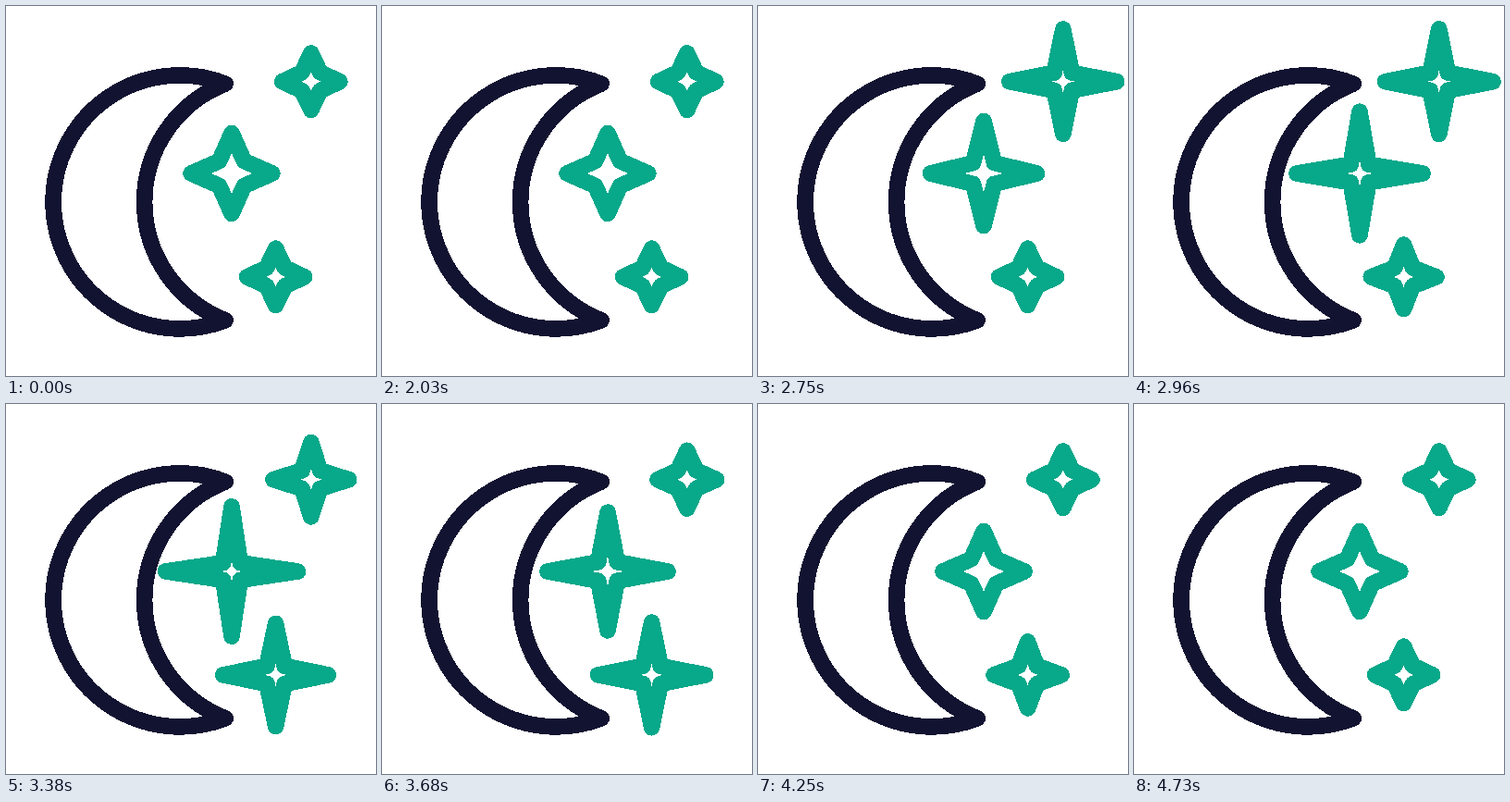
These frames come from a looping animation (400x400 px, 5.03 s). An HTML page:

```html
<!DOCTYPE html>
<html lang="en">
<head>
<meta charset="utf-8">
<title>Moon and stars</title>
<style>
  html, body { margin: 0; width: 100%; height: 100%; overflow: hidden; background: #fff; }
  svg { display: block; width: 100%; height: 100%; shape-rendering: crispEdges; }
  path { fill: none; stroke-width: 17.6; stroke-linecap: round; stroke-linejoin: round; }
  .moon { stroke: #121331; }
  .star {
    stroke: #08a88a;
    animation: 5030ms cubic-bezier(.4, 0, .4, 1) infinite;
  }
  .small { d: path("M0 -30.7L9.9 -9.9L31.1 0L9.9 9.9L0 30.7L-9.9 9.9L-31.1 0L-9.9 -9.9Z"); }
  .large { d: path("M0 -43.5L13.4 -13.4L44 0L13.4 13.4L0 43.5L-13.4 13.4L-44 0L-13.4 -13.4Z"); }
  .top { animation-name: twinkle-top; }
  .middle { animation-name: twinkle-middle; }
  .bottom { animation-name: twinkle-bottom; }

  /* Each star stretches its tips, holds briefly, then settles back. */
  @keyframes twinkle-top {
    0%, 40.06%, 76.04%, 100% { d: path("M0 -30.7L9.9 -9.9L31.1 0L9.9 9.9L0 30.7L-9.9 9.9L-31.1 0L-9.9 -9.9Z"); }
    56.16%, 58.45% { d: path("M0 -56.8L9.6 -9.6L58.2 0L9.6 9.6L0 56.8L-9.6 9.6L-58.2 0L-9.6 -9.6Z"); }
  }
  @keyframes twinkle-middle {
    0%, 47.91%, 85.88%, 100% { d: path("M0 -43.5L13.4 -13.4L44 0L13.4 13.4L0 43.5L-13.4 13.4L-44 0L-13.4 -13.4Z"); }
    64.02%, 67.99% { d: path("M0 -70.1L9.3 -9.3L71.5 0L9.3 9.3L0 70.1L-9.3 9.3L-71.5 0L-9.3 -9.3Z"); }
  }
  @keyframes twinkle-bottom {
    0%, 55.21%, 91.65%, 100% { d: path("M0 -30.7L9.9 -9.9L31.1 0L9.9 9.9L0 30.7L-9.9 9.9L-31.1 0L-9.9 -9.9Z"); }
    70.42%, 73.56% { d: path("M0 -56.8L9.6 -9.6L58.2 0L9.6 9.6L0 56.8L-9.6 9.6L-58.2 0L-9.6 -9.6Z"); }
  }
</style>
</head>
<body>
<svg viewBox="0 0 400 400">
  <path class="moon" d="M237.2 84A137 137 0 1 0 237.2 339.8A137.2 137.2 0 0 1 237.2 84Z"/>
  <path class="star small top" transform="translate(329.8 81.7)"/>
  <path class="star large middle" transform="translate(244 181)"/>
  <path class="star small bottom" transform="translate(291.6 292.9)"/>
</svg>
</body>
</html>
```
